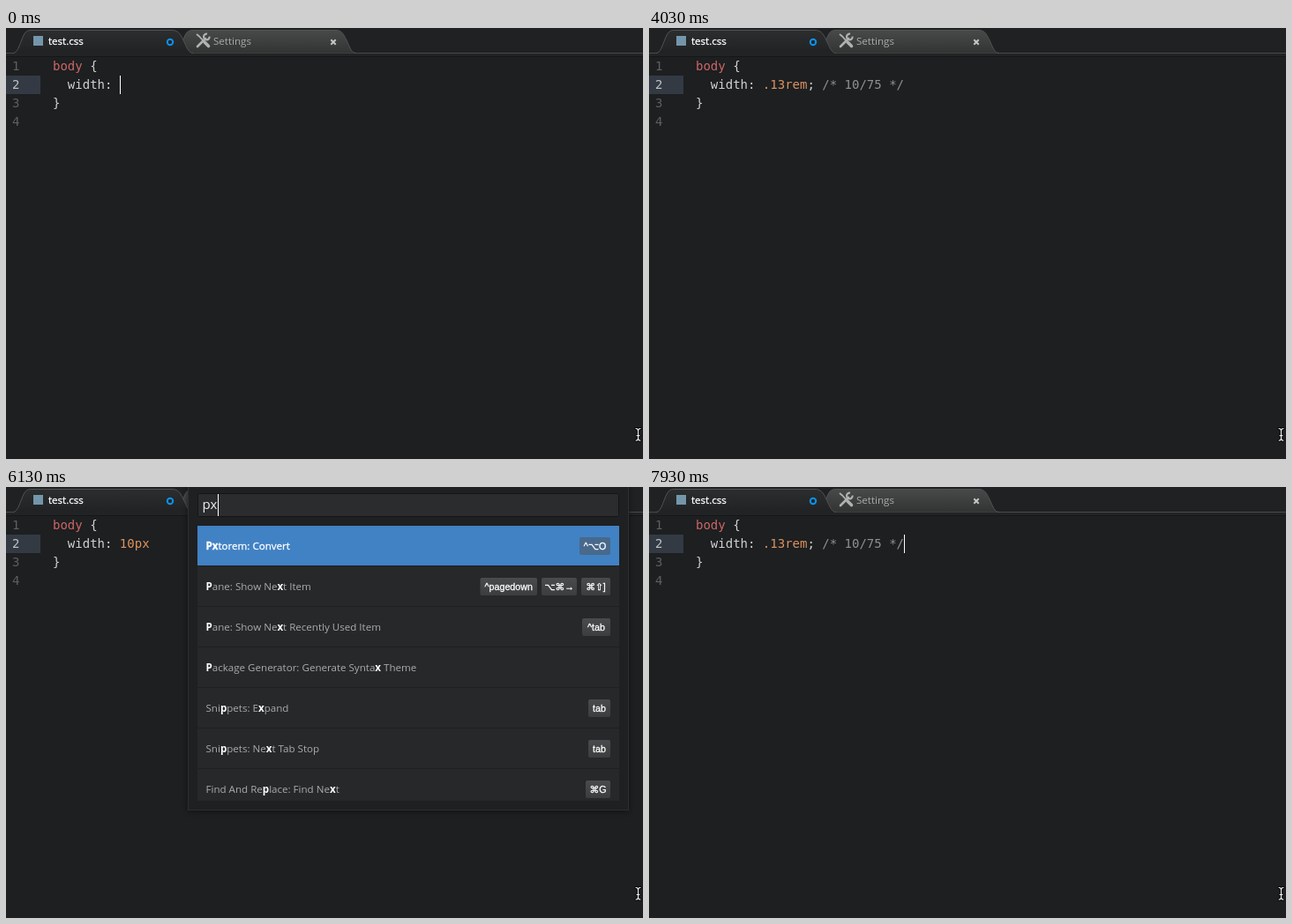
These frames come from a looping animation (722 by 489 pixels, 8000 ms). An HTML page:

```html
<!DOCTYPE html>
<html lang="en">
<head>
<meta charset="utf-8">
<title>Editor: px to rem</title>
<style>
  html, body { margin: 0; width: 100%; height: 100%; overflow: hidden; background: #1d1f21; }
  svg { display: block; }
  text { white-space: pre; }
  .code text { font: 14px "DejaVu Sans Mono", monospace; fill: #d0d2d1; }
  .code .tag { fill: #cc6666; }
  .code .num { fill: #de935f; }
  .code .note { fill: #8f9190; }
  .code .line { fill: #5d6062; }
  .code .now { fill: #c0c4c6; }
  .ui { font: 11.58px "Open Sans", sans-serif; fill: #aaabac; }
  .ui .hit { font-weight: 700; fill: #fff; }
  .lit { fill: #fff; stroke: #fff; stroke-width: .3px; }
  .query { font: 15px "Open Sans", sans-serif; fill: #eee; }
  .key { font: 10.7px "Liberation Sans", "DejaVu Sans", sans-serif; fill: #fff; stroke: #fff; stroke-width: .3px; text-anchor: middle; }
</style>
</head>
<body>
<svg width="722" height="489" viewBox="0 0 722 489">
  <defs>
    <linearGradient id="idle" x2="0" y2="1"><stop stop-color="#484949"/><stop offset="1" stop-color="#323333"/></linearGradient>
    <linearGradient id="active" x2="0" y2="1"><stop stop-color="#2c2d2e"/><stop offset="1" stop-color="#212223"/></linearGradient>
    <linearGradient id="cap" x2="0" y2="1"><stop stop-color="#4a4b4d"/><stop offset="1" stop-color="#3c3d3f"/></linearGradient>
    <filter id="soft" x="-5%" y="-5%" width="110%" height="110%"><feGaussianBlur stdDeviation="3"/></filter>
    <clipPath id="list"><rect x="217" y="44" width="478" height="312"/></clipPath>
  </defs>

  <rect width="722" height="489" fill="#1d1f21"/>
  <rect width="722" height="32" fill="#202122"/>
  <rect y="28" width="722" height="1" fill="#47494a"/>
  <rect y="29" width="722" height="3" fill="#222324"/>
  <rect y="32" width="722" height="1" fill="#151617"/>

  <g stroke="#505253">
    <path fill="url(#idle)" d="M190 28.5C196 28.5 198 20 201 13C204 5 206 2.5 212 2.5H374C381 2.5 383 8 386 14C390 22 391 28.5 397 28.5"/>
    <path fill="url(#active)" d="M8 28.5C13 28.5 15 20 18 13C21 5 23 2.5 29 2.5H188C196 2.5 198 8 201 14C205 22 207 28.5 212 28.5"/>
  </g>
  <path d="M10 28.5H210" stroke="#222324"/>
  <rect x="31" y="9" width="11" height="11" fill="#7496aa"/>
  <text class="ui lit" x="48" y="19" style="fill:#fff">test.css</text>
  <circle cx="186" cy="16" r="3.2" fill="none" stroke="#0a92f0" stroke-width="2"/>

  <g fill="none" stroke="#b0b1b1">
    <path d="M217 21L226 12" stroke-width="2.6" stroke-linecap="round"/>
    <path d="M229.6 7.3L227 10L228.2 11.2L230.8 8.6" stroke="none"/>
    <path d="M228 6.8A3.3 3.3 0 1 0 230.6 9.6" stroke-width="2.2"/>
    <path d="M216 7L219 9.5L224 15" stroke-width="1.8"/>
    <path d="M225 16L229.5 20.5" stroke-width="3.6" stroke-linecap="round"/>
  </g>
  <text class="ui" x="235" y="19">Settings</text>
  <path d="M368.3 13.3L373.7 18.7M373.7 13.3L368.3 18.7" stroke="#c4c5c5" stroke-width="2"/>

  <g class="code">
    <rect y="54" width="39" height="21" fill="#343a43"/>
    <text class="line" x="7" y="48">1</text>
    <text class="now" x="7" y="69">2</text>
    <text class="line" x="7" y="90">3</text>
    <text class="line" x="7" y="111">4</text>
    <text x="53" y="48"><tspan class="tag">body</tspan> {</text>
    <text id="rule" x="53" y="69"></text>
    <text x="53" y="90">}</text>
  </g>
  <g id="live"></g>

  <g fill="none" stroke-linecap="round">
    <path id="beam" d="M714 454.5Q716.5 454.5 716.5 457V465.500Q716.500 468 714 468M719 454.5Q716.5 454.5 716.5 457M719 468Q716.5 468 716.5 465.5M715 462.500H718" stroke="#000" stroke-width="3"/>
    <use href="#beam" style="stroke:#fff"/>
  </g>
</svg>
<script>
const $ = id => document.getElementById(id);
const LOOP = 8000, CHAR = 8.43;
const beam = $('beam');
const top2 = beam.cloneNode();
top2.removeAttribute('id');
top2.setAttribute('stroke', '#f4f4f4');
top2.setAttribute('stroke-width', '1.2');
beam.parentNode.querySelector('use').replaceWith(top2);

const span = (cls, s) => `<tspan class="${cls}">${s}</tspan>`;
const rect = (x, y, w, h, fill, extra = '') =>
  `<rect x="${x}" y="${y}" width="${w}" height="${h}" fill="${fill}" ${extra}/>`;

// Value markup and its length in characters
const values = {
  none: ['', 0],
  one: [span('num', '1'), 1],
  ten: [span('num', '10'), 2],
  tenP: [span('num', '10') + 'p', 3],
  px: [span('num', '10px'), 4],
  rem: [span('num', '.13rem') + '; ' + span('note', '/* 10/75 */'), 19]
};

// Row: label with *matches*, then key caps as [text, left, right]
const commands = [
  ['About: View Release Notes'],
  ['Application: About'],
  ['Application: Add Project Folder', ['⇧⌘O', 647, 685]],
  ['Application: Bring All Windows To Front'],
  ['Application: Hide', ['⌘H', 657, 685]],
  ['Application: Hide Other Applications', ['⌥⌘H', 647, 685]],
  ['Application: Install Update']
];
const matches = [
  ['*Px*torem: Convert', ['^⌥O', 650, 685]],
  ['*P*ane: Show Ne*x*t Item', ['^pagedown', 537.5, 602], ['⌥⌘→', 607, 647], ['⌘⇧]', 652, 685]],
  ['*P*ane: Show Ne*x*t Recently Used Item', ['^tab', 653, 685]],
  ['*P*ackage Generator: Generate Synta*x* Theme'],
  ['Sni*p*pets: E*x*pand', ['tab', 660, 685]],
  ['Sni*p*pets: Ne*x*t Tab Stop', ['tab', 660, 685]],
  ['Find And Re*p*lace: Find Ne*x*t', ['⌘G', 657, 685]]
];

function row([label, ...keys], i) {
  const y = 44 + 46 * i;
  const text = label.replace(/\*(.+?)\*/g, (m, s) => span('hit', s));
  const caps = keys.map(([s, l, r]) =>
    rect(l, y + 13, r - l, 20, i ? 'url(#cap)' : '#48698c', 'rx="2"') +
    `<text class="key" x="${(l + r) / 2}" y="${y + 27}">${s}</text>`).join('');
  return rect(217, y, 478, 45, i ? '#27282a' : '#4182c4') +
    rect(217, y + 45, 478, 1, '#1f2022') +
    `<text class="ui ${i ? '' : 'lit'}" ${i ? '' : 'style="fill:#fff"'} x="226.500" y="${y + 27}">${text}</text>` + caps;
}

function palette(query, caret) {
  const list = query === 'px' ? matches : commands;
  return rect(206, -10, 500, 378, '#000', 'opacity=".45" filter="url(#soft)"') +
    rect(206.5, -5.5, 499, 372, '#1f2021', 'stroke="#2d2f30"') +
    rect(217.5, 7.5, 477, 26, '#2a2c2d', 'stroke="#141516" rx="1"') +
    `<text class="query" x="222.500" y="25">${query}</text>` +
    (caret ? rect(223 + Math.round(8.5 * query.length), 8, 1, 25, '#fff') : '') +
    `<g clip-path="url(#list)">${list.map(row).join('')}</g>`;
}

const popup = right =>
  rect(121.5, 76.5, right - 122, 27, '#292b2d', 'stroke="#191b1c"') +
  rect(122, 77, right - 123, 26, '#34373a') +
  `<text class="ui lit" x="146" y="94" style="fill:#fff">px</text>`;

// Start time, value, caret shown, popup right edge, palette query
const steps = [
  [0, 'none', 1], [150, 'none', 0], [600, 'none', 1],
  [1050, 'one', 1], [1200, 'ten', 1], [1640, 'tenP', 1],
  [1790, 'px', 1, 323], [1940, 'px', 1, 322], [2240, 'px', 0, 322],
  [2690, 'rem', 1], [3130, 'rem', 0], [3580, 'rem', 1], [4030, 'rem', 0],
  [4180, 'px', 1], [4630, 'px', 0], [5080, 'px', 1],
  [5230, 'px', 0, 0, ''], [5530, 'px', 1, 0, ''], [5980, 'px', 1, 0, 'p'],
  [6130, 'px', 1, 0, 'px'], [6580, 'px', 0, 0, 'px'], [7030, 'px', 1, 0, 'px'],
  [7180, 'rem', 1], [7630, 'rem', 0], [7930, 'rem', 1]
];

let shown;
function draw(t) {
  const step = steps.findLast(s => s[0] <= t);
  if (step === shown) return;
  shown = step;
  const [, name, caret, edge, query] = step;
  const [markup, length] = values[name];
  $('rule').innerHTML = '  width: ' + markup;
  const open = query !== undefined;
  $('live').innerHTML = open ? palette(query, caret) :
    (caret ? rect(Math.round(53 + CHAR * (9 + length)), 54, 1, 21, '#fff') : '') +
    (edge ? popup(edge) : '');
}

const start = performance.now();
function tick(now) {
  draw(Math.max(0, now - start) % LOOP);
  requestAnimationFrame(tick);
}
draw(0);
requestAnimationFrame(tick);
</script>
</body>
</html>
```
